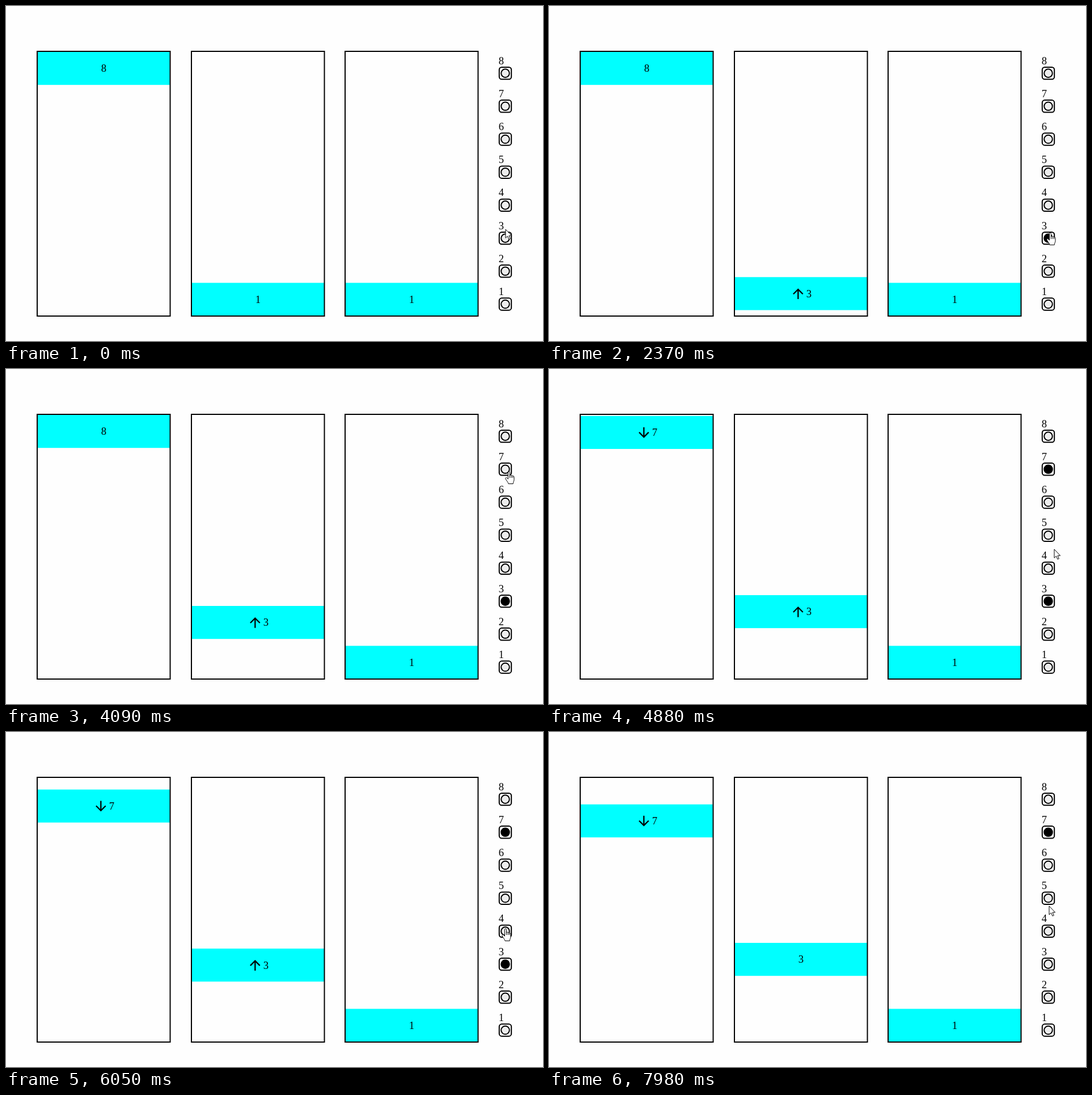
Write an HTML page with a canvas that moves like this. It is 947 px wide and 591 px high and loops after 8000 ms.

```html
<!DOCTYPE html>
<html lang="en">
<head>
<meta charset="utf-8">
<title>Elevators</title>
<style>
html, body { margin: 0; width: 100%; height: 100%; overflow: hidden; background: #fefefe; }
canvas { display: block; }
</style>
</head>
<body>
<canvas id="stage" width="947" height="591"></canvas>
<script>
const ctx = document.getElementById('stage').getContext('2d');
const LOOP = 8000, FLOOR = 58.2, TOP = 81, TRAVEL = 6840;
const floorTop = n => TOP + (8 - n) * FLOOR;

const shafts = [
  { x: 55, from: 8, to: 7, call: 4150, start: 4560, done: Infinity },
  { x: 327, from: 1, to: 3, call: 1250, start: 1690, done: 7900 },
  { x: 598, from: 1, to: 1, call: Infinity, start: Infinity, done: Infinity }
];

// Pointer path: time, x, y
const path = [
  [0, 881, 394], [149, 881, 394], [150, 883, 399], [300, 884, 400],
  [2800, 884, 400], [2880, 895, 375], [3143, 897, 217], [3350, 895, 200],
  [3800, 888, 182], [4084, 887, 181], [4400, 887, 182], [4500, 895, 200],
  [4890, 891, 318], [5150, 893, 332], [5700, 882, 346], [6099, 881, 347],
  [7300, 881, 347], [7600, 883, 325], [7900, 882, 307]
];

const arrowShape = new Path2D('M0 0V15.3L3.5 12L5.9 17.6L8.3 16.6L6 11.2H10.6Z');
const handShape = new Path2D('M-1.6 1.4C-1.6-.4 1.4-.4 1.4 1.4V7C1.6 5.6 4.2 5.8 4.2 7.4' +
  'C4.6 6.3 6.8 6.6 6.8 8.2C7.4 7.3 9 7.8 9 9.4V14.5C9 17 7.4 18 7.2 21.5H-1' +
  'C-1.2 18.6-4.6 16-6 12.8C-6.8 10.8-4.6 9.8-3.4 11.2L-1.6 13.2Z');
const knuckles = new Path2D('M1.4 6.5V11M4.2 7.4V11M6.8 8.2V11');

const bez = (a, b, u) => 3 * a * u * (1 - u) ** 2 + 3 * b * u * u * (1 - u) + u ** 3;

// cubic-bezier(.25, .1, .25, 1)
function ease(x) {
  if (!(x > 0)) return 0;
  if (x >= 1) return 1;
  let lo = 0, hi = 1;
  for (let i = 0; i < 24; i++) {
    const mid = (lo + hi) / 2;
    if (bez(.25, .25, mid) < x) lo = mid; else hi = mid;
  }
  return bez(.1, 1, lo);
}

// The picture refreshes at a coarse, steady rate once things move
function sample(t) {
  const step = 134.35, k = Math.floor((t - 1800) / step + .4);
  return k < 0 ? t : 1800 + k * step;
}

function pointer(t) {
  const i = path.findIndex(p => p[0] > t);
  if (i < 0) return path[path.length - 1].slice(1);
  const [t0, x0, y0] = path[i - 1], [t1, x1, y1] = path[i];
  const f = (t - t0) / (t1 - t0);
  return [x0 + (x1 - x0) * f, y0 + (y1 - y0) * f];
}

function text(s, x, y) {
  ctx.fillStyle = '#000';
  ctx.fillText(s, x, y);
}

function drawArrow(x, y, dir) {
  ctx.save();
  ctx.translate(x, y);
  ctx.scale(1, dir);
  ctx.lineWidth = 2.3;
  ctx.beginPath();
  ctx.moveTo(0, 9.4);
  ctx.lineTo(0, -7.8);
  ctx.moveTo(-8.4, .6);
  ctx.lineTo(0, -7.8);
  ctx.lineTo(8.4, .6);
  ctx.stroke();
  ctx.restore();
}

function drawShaft(s, t) {
  const a = floorTop(s.from), b = floorTop(s.to);
  const y = a + (b - a) * (t >= s.done ? 1 : ease((t - s.start) / TRAVEL));
  const mid = s.x + 117.3, cy = y + FLOOR / 2 + .3;
  ctx.fillStyle = '#0ff';
  ctx.fillRect(s.x, y, 234.5, FLOOR);
  if (t >= s.call && t < s.done) {
    drawArrow(mid - 5, cy, s.to > s.from ? 1 : -1);
    text(s.to, mid + 14, cy + 6);
  } else {
    text(t < s.call ? s.from : s.to, mid, cy + 6);
  }
  ctx.lineWidth = 2;
  ctx.strokeRect(s.x, 80, 234.5, 467);
}

function drawButton(n, t) {
  const y = 118.6 + (8 - n) * FLOOR;
  const lit = shafts.some(s => s.to === n && t >= s.call && t < s.done);
  text(n, 873.3, y - 16);
  ctx.lineWidth = 2;
  ctx.beginPath();
  ctx.roundRect(869.8, y - 10.7, 21.4, 21.4, 4.5);
  ctx.stroke();
  ctx.fillStyle = lit ? '#000' : '#eee';
  ctx.beginPath();
  ctx.arc(880.5, y, 7.3, 0, 7);
  ctx.fill();
  ctx.stroke();
}

function drawPointer(t) {
  const [x, y] = pointer(t);
  const row = (y - 107) % FLOOR;
  const over = x > 869 && x < 892 && row >= 0 && row < 23.3;
  const shape = over ? handShape : arrowShape;
  ctx.save();
  ctx.translate(x, y);
  ctx.lineWidth = 1;
  ctx.lineJoin = 'round';
  ctx.fillStyle = '#fff';
  ctx.fill(shape);
  ctx.stroke(shape);
  if (over) ctx.stroke(knuckles);
  ctx.restore();
}

function draw(now) {
  const t = sample(now % LOOP);
  ctx.fillStyle = '#fefefe';
  ctx.fillRect(0, 0, 947, 591);
  ctx.strokeStyle = '#000';
  ctx.font = '18.6px "Liberation Serif", "Times New Roman", serif';
  ctx.textAlign = 'center';
  shafts.forEach(s => drawShaft(s, t));
  for (let n = 1; n <= 8; n++) drawButton(n, t);
  drawPointer(t);
}

const begin = performance.now();
function tick() {
  draw(performance.now() - begin);
  requestAnimationFrame(tick);
}
tick();
</script>
</body>
</html>
```
